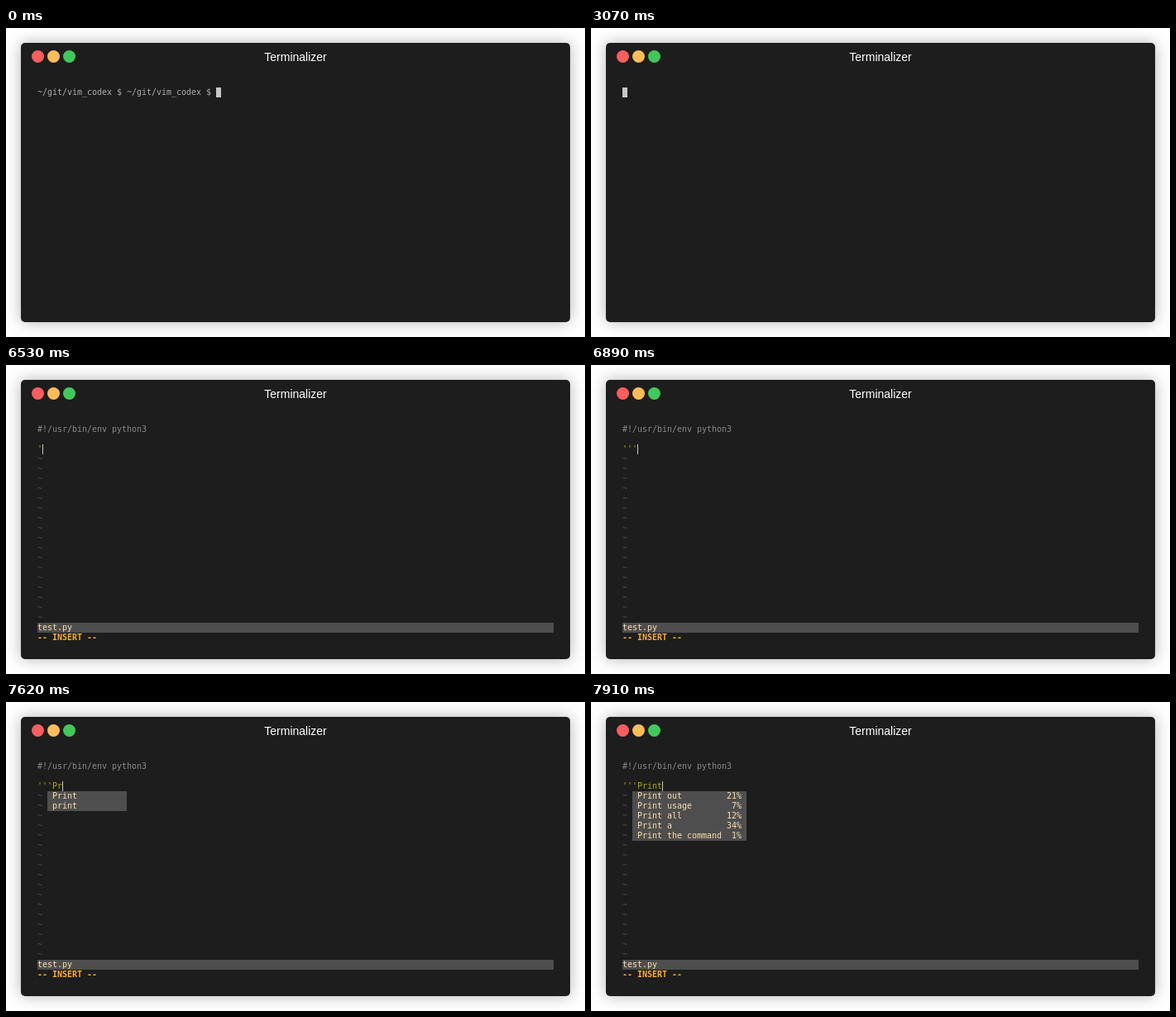
Animation, 700 px wide and 374 px high, one loop 8000 ms. Source, as an HTML page:

```html
<!DOCTYPE html>
<html lang="en">
<head>
<meta charset="utf-8">
<title>Terminalizer</title>
<style>
  html, body { margin: 0; width: 100%; height: 100%; overflow: hidden; background: #fff; }
  .window {
    position: absolute; left: 18px; top: 18px; width: 664px; height: 338px;
    border-radius: 5px; background: #1d1d1d; box-shadow: 0 0 18px rgba(0, 0, 0, .3);
  }
  .title {
    position: absolute; left: 0; right: 0; top: 9px; text-align: center; color: #fff;
    font: 14px/16px "Liberation Sans", Arial, sans-serif;
  }
  .dot { position: absolute; top: 9px; width: 15px; height: 15px; border-radius: 50%; }
  .screen {
    position: absolute; left: 20px; top: 54px; width: 624px; height: 264px; color: #afafaf;
    font: 10px/12px "DejaVu Sans Mono", monospace; letter-spacing: -.0205px;
  }
  .screen span { position: absolute; height: 12px; white-space: pre; }
  .block { width: 6px; background: #c7c7c7; }
  .bar { width: 1px; background: #c7c7c7; }
  .comment { color: #8a8a8a; }
  .tilde { color: #4e4e4e; }
  .string { color: #afaf00; }
  .mode { color: #ffaf2f; font-weight: bold; }
  .menu { color: #ffdfaf; background: #4e4e4e; }
</style>
</head>
<body>
<div class="window">
  <div class="dot" style="left:13px;background:#f75e5e"></div>
  <div class="dot" style="left:32px;background:#fcbc5a"></div>
  <div class="dot" style="left:51px;background:#43c75b"></div>
  <div class="title">Terminalizer</div>
  <div class="screen" id="screen"></div>
</div>
<script>
const LOOP = 8000, CELL = 6, LINE = 12, COLS = 104;
const screen = document.getElementById('screen');
const prompt = '~/git/vim_codex $ '.repeat(2);

function put(col, row, text, cls = '', cells = 0) {
  const el = document.createElement('span');
  el.className = cls;
  el.textContent = text;
  el.style.left = col * CELL + 'px';
  el.style.top = row * LINE + 'px';
  if (cells) el.style.width = cells * CELL + 'px';
  screen.append(el);
}

function shell(text) {
  put(0, 0, prompt + text);
  put(prompt.length + text.length, 0, '', 'block');
}

function blank() {
  put(0, 0, '', 'block');
}

function editor(firstTilde) {
  put(0, 0, '#!/usr/bin/env python3', 'comment');
  for (let row = firstTilde; row < 20; row++) put(0, row, '~', 'tilde');
  put(0, 20, 'test.py', 'menu', COLS);
}

function normal(row) {
  editor(2);
  put(0, row, '', 'block');
}

function insert(text, items = []) {
  editor(3);
  put(0, 2, text, 'string');
  put(text.length, 2, '', 'bar');
  put(0, 21, '-- INSERT --', 'mode');
  const pad = Math.max(...items.map(([word]) => word.length)) + 1;
  const width = Math.max(16, pad + 5);
  items.forEach(([word, odds], i) => {
    const label = odds ? word.padEnd(pad) + odds.padStart(3) : word;
    put(2, 3 + i, ' ' + label, 'menu', width);
  });
}

const words = [['Print'], ['Please'], ['python3'], ['print'], ['input_prompt']];
const matches = [['Print'], ['print']];
const guesses = [['Print', '99%'], ['print("'], ['print']];
const phrases = [['Print out', '21%'], ['Print usage', '7%'], ['Print all', '12%'],
  ['Print a', '34%'], ['Print the command', '1%']];

const steps = [
  [0, shell, ''],
  [720, shell, 'v'], [790, shell, 'vi'], [850, shell, 'vi '],
  [1070, shell, 'vi t'], [1150, shell, 'vi te'], [1230, shell, 'vi tes'], [1300, shell, 'vi test'],
  [1620, shell, 'vi test.'], [2240, shell, 'vi test.p'], [2450, shell, 'vi test.py'],
  [3030, blank],
  [3410, normal, 0], [4210, normal, 1],
  [5310, insert, ''],
  [6530, insert, "'"], [6700, insert, "''"], [6870, insert, "'''"],
  [7320, insert, "'''P"], [7440, insert, "'''P", words],
  [7580, insert, "'''Pr", matches], [7670, insert, "'''Pri", matches],
  [7710, insert, "'''Pri", guesses], [7740, insert, "'''Prin", guesses],
  [7830, insert, "'''Print", matches], [7910, insert, "'''Print", phrases],
];

let shown;
const start = performance.now();
function tick() {
  const t = (performance.now() - start) % LOOP;
  const step = steps.findLast(([at]) => at <= t);
  if (step !== shown) {
    shown = step;
    const [, draw, ...args] = step;
    screen.replaceChildren();
    draw(...args);
  }
  requestAnimationFrame(tick);
}
tick();
</script>
</body>
</html>
```
